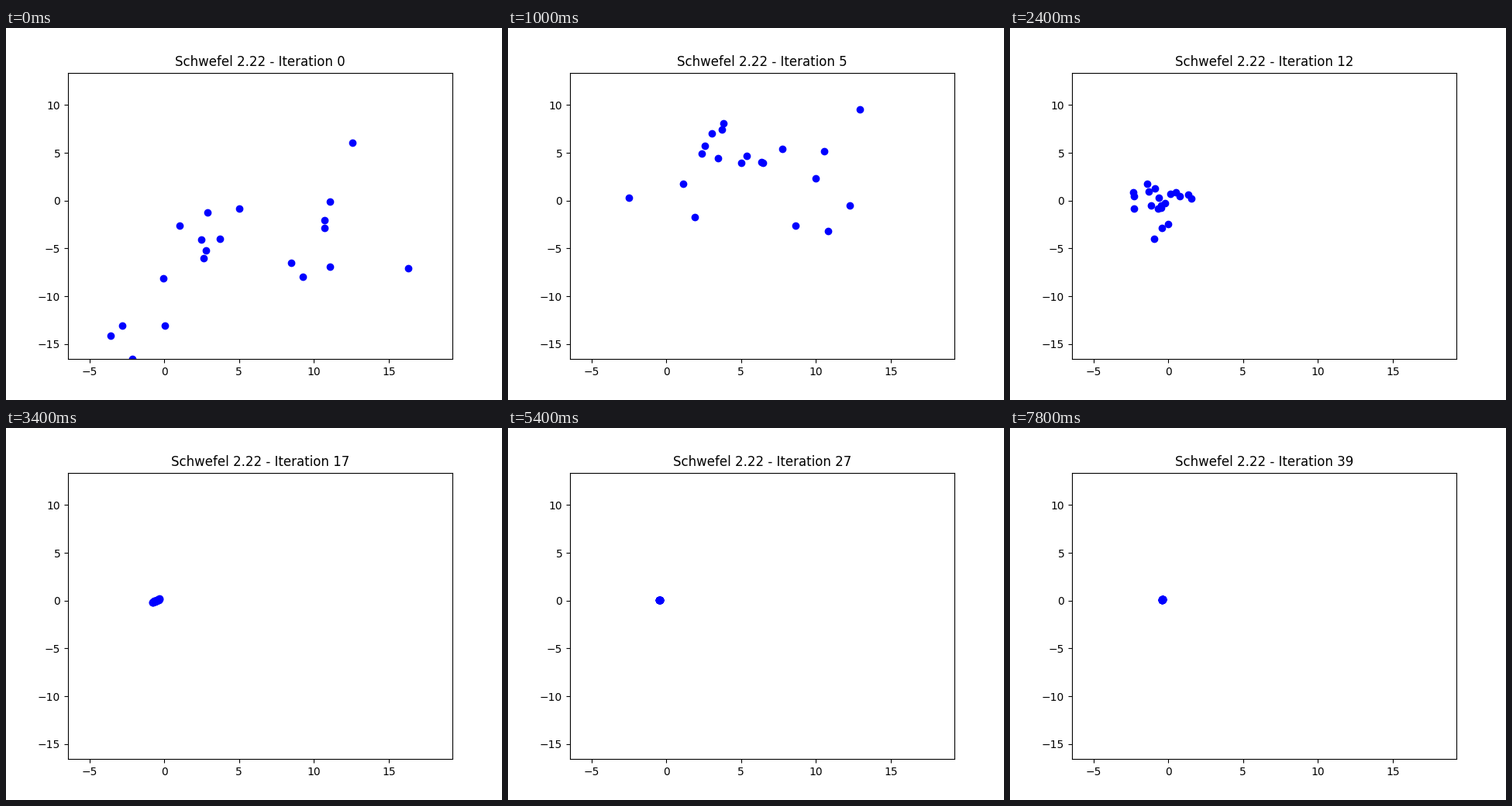
Animation of 640 by 480 pixels, one loop 8 s. Source, as a matplotlib script:

```python
import numpy as np
import matplotlib.pyplot as plt
from matplotlib.animation import FuncAnimation

FRAMES, STEP_MS = 40, 200
N = 20
rng = np.random.default_rng(22)

START = np.array([
    (-3.59, -14.12), (-2.81, -13.07), (-2.14, -16.56), (-0.07, -8.13),
    (0.04, -13.07), (1.02, -2.62), (2.47, -4.08), (2.63, -6.02),
    (2.78, -5.21), (2.89, -1.24), (3.72, -4.00), (5.01, -0.83),
    (8.48, -6.51), (9.26, -7.97), (10.71, -2.05), (10.71, -2.86),
    (11.07, -0.11), (11.07, -6.91), (12.58, 6.05), (16.31, -7.07)])


def normal():
    """N normal values with exactly zero mean and unit spread."""
    v = rng.standard_normal(N)
    return (v - v.mean()) / v.std()


def cloud(centre, spread, tilt):
    """Random swarm, ordered left to right like the starting points."""
    x = np.sort(normal())
    y = tilt * x + np.sqrt(1 - tilt ** 2) * normal()
    return np.array(centre) + np.column_stack([x, y]) * spread


def swing(dx, size):
    """Sideways detour each particle makes between two layouts."""
    return np.column_stack([dx + size * normal(), 1.5 * size * normal()])


along = np.linspace(-1, 1, N)
STREAK = np.column_stack([along, 0.65 * along + rng.uniform(-0.2, 0.2, N)])


def settle(i):
    """Tight streak that shrinks to a single slowly drifting dot."""
    t = [17, 22, 31, 39]
    centre = (np.interp(i, t, [-0.56, -0.45, -0.45, -0.40]),
              np.interp(i, t, [-0.02, 0.03, 0.07, 0.10]))
    return centre + (0.01 + 0.24 * 0.62 ** (i - 17)) * STREAK


KEYS = [0, 5, 9, 17]
LAYOUTS = [START,
           cloud((5.78, 3.54), (4.0, 4.05), 0.34),
           cloud((-0.27, -0.35), (1.5, 2.0), -0.1),
           settle(17)]
SWINGS = [swing(0, 1.5), swing(-2.3, 0.8), swing(-0.2, 0.4)]


def positions(i):
    if i >= KEYS[-1]:
        return settle(i)
    k = np.searchsorted(KEYS, i, side="right") - 1
    u = (i - KEYS[k]) / (KEYS[k + 1] - KEYS[k])
    a, b = LAYOUTS[k], LAYOUTS[k + 1]
    return a + (b - a) * u + SWINGS[k] * np.sin(np.pi * u)


fig, ax = plt.subplots(figsize=(6.4, 4.8), dpi=100)
dots = ax.scatter(*START.T, c="blue")
ax.set_xlim(-6.44, 19.26)
ax.set_ylim(-16.57, 13.38)
title = ax.set_title("")


def draw(i):
    dots.set_offsets(positions(i))
    title.set_text(f"Schwefel 2.22 - Iteration {i}")
    return dots, title


anim = FuncAnimation(fig, draw, frames=FRAMES, interval=STEP_MS,
                     repeat=True, repeat_delay=0)
plt.show()
```
